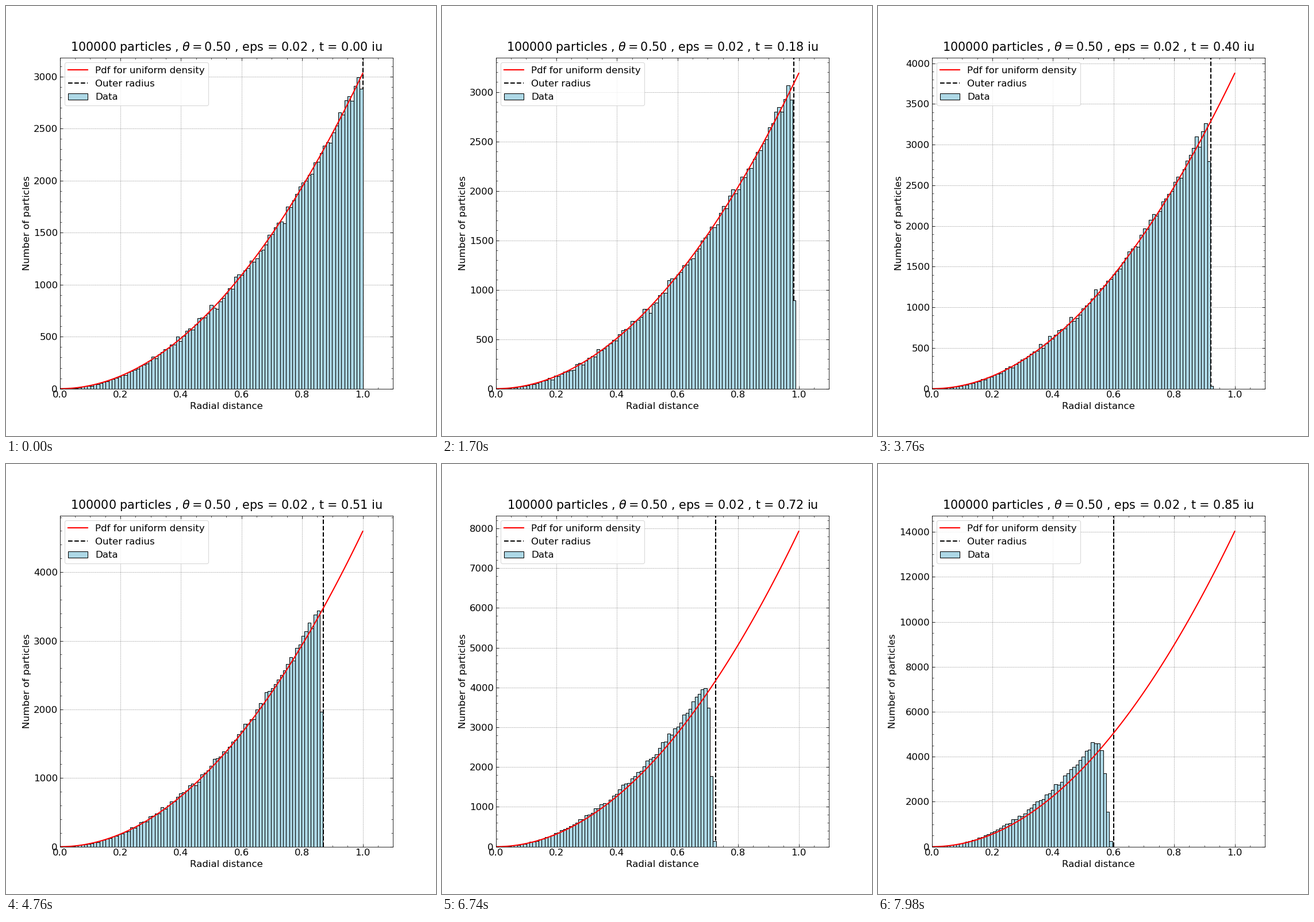
Write a matplotlib script that moves like this. It is 748 by 748 pixels and loops after 8 s.

```python
import numpy as np
import matplotlib.pyplot as plt
from matplotlib.animation import FuncAnimation
from matplotlib.patches import PathPatch
from matplotlib.path import Path
from matplotlib.ticker import AutoMinorLocator

plt.rcParams.update({
    "font.family": "DejaVu Sans", "font.size": 16,
    "xtick.direction": "in", "ytick.direction": "in",
    "xtick.top": True, "ytick.right": True,
    "xtick.major.size": 5, "ytick.major.size": 5,
    "xtick.minor.size": 3, "ytick.minor.size": 3,
})

N = 100_000
BINS = 99
EDGES = np.linspace(0, 1, BINS + 1)
STEPS = 172
DT = 0.005
TICK = 20
LOOP = 8000

BETA = np.linspace(0, 1.2, 4000)
FALL_TIME = (BETA + np.sin(2 * BETA) / 2) / np.sqrt(2)


def fall_radius(t):
    """Radius of a cold uniform sphere collapsing from rest."""
    return np.cos(np.interp(t, FALL_TIME, BETA)) ** 2


def outer_radius(t):
    """Softened gravity makes the outermost particle lag behind."""
    return fall_radius(t * (1 - 0.0302 * np.tanh(t / 0.47)))


rng = np.random.default_rng(4)
start = np.cbrt(rng.random(N))
# Skewed scatter that blurs the outer shells as the fall goes on
scatter = (np.euler_gamma - rng.gumbel(size=N)) / 1.28 * start ** 3


def snapshot(step):
    t = step * DT
    outer = outer_radius(t)
    r = start * fall_radius(0.997 * t) + 0.02 * t ** 3 * scatter
    r = np.clip(r, 0, min(outer, 1 - 1e-9))
    counts = np.bincount((r * BINS).astype(int), minlength=BINS)
    return t, outer, counts


def bars_path(counts):
    polys = [[(a, 0), (a, c), (b, c), (b, 0), (a, 0)]
             for a, b, c in zip(EDGES, EDGES[1:], counts) if c]
    codes = [Path.MOVETO] + [Path.LINETO] * 3 + [Path.CLOSEPOLY]
    return Path(np.concatenate(polys), codes * len(polys))


def step_at(ms):
    # Steps come in threes: two short ones, then a long hold
    group, rest = divmod(ms + TICK, 140)
    return 3 * group + min(rest // TICK, 2) - 1


snapshots = [snapshot(s) for s in range(STEPS)]

fig, ax = plt.subplots(figsize=(10, 10), dpi=74.8)
x = np.linspace(0, 1, 100)
pdf, = ax.plot(x, x ** 2, color="red", lw=2, label="Pdf for uniform density")
rim = ax.axvline(1, color="black", ls="--", lw=2, zorder=0.9,
                 label="Outer radius")
bars = PathPatch(bars_path(snapshots[0][2]), fc="lightblue", ec="black",
                 lw=1, label="Data")
ax.add_patch(bars)

ax.set_xlim(0, 1.1)
ax.set_xlabel("Radial distance")
ax.set_ylabel("Number of particles")
ax.xaxis.set_minor_locator(AutoMinorLocator())
ax.yaxis.set_minor_locator(AutoMinorLocator())
ax.set_axisbelow(True)
ax.grid(color="black", alpha=0.5, ls="--", lw=0.5)
ax.legend(loc="upper left")
title = ax.set_title("", fontsize=20, pad=11)


def update(i):
    t, outer, counts = snapshots[step_at(i * TICK)]
    peak = 3 * N / BINS / outer ** 3
    pdf.set_ydata(peak * x ** 2)
    rim.set_xdata([outer, outer])
    bars.set_path(bars_path(counts))
    ax.set_ylim(0, 1.05 * peak)
    title.set_text(rf"{N} particles , $\theta = 0.50$ , eps = 0.02 , t = {t:.2f} iu")
    return pdf, rim, bars, title


anim = FuncAnimation(fig, update, frames=LOOP // TICK, interval=TICK,
                     init_func=lambda: update(0), repeat=True, repeat_delay=0)
plt.show()
```
